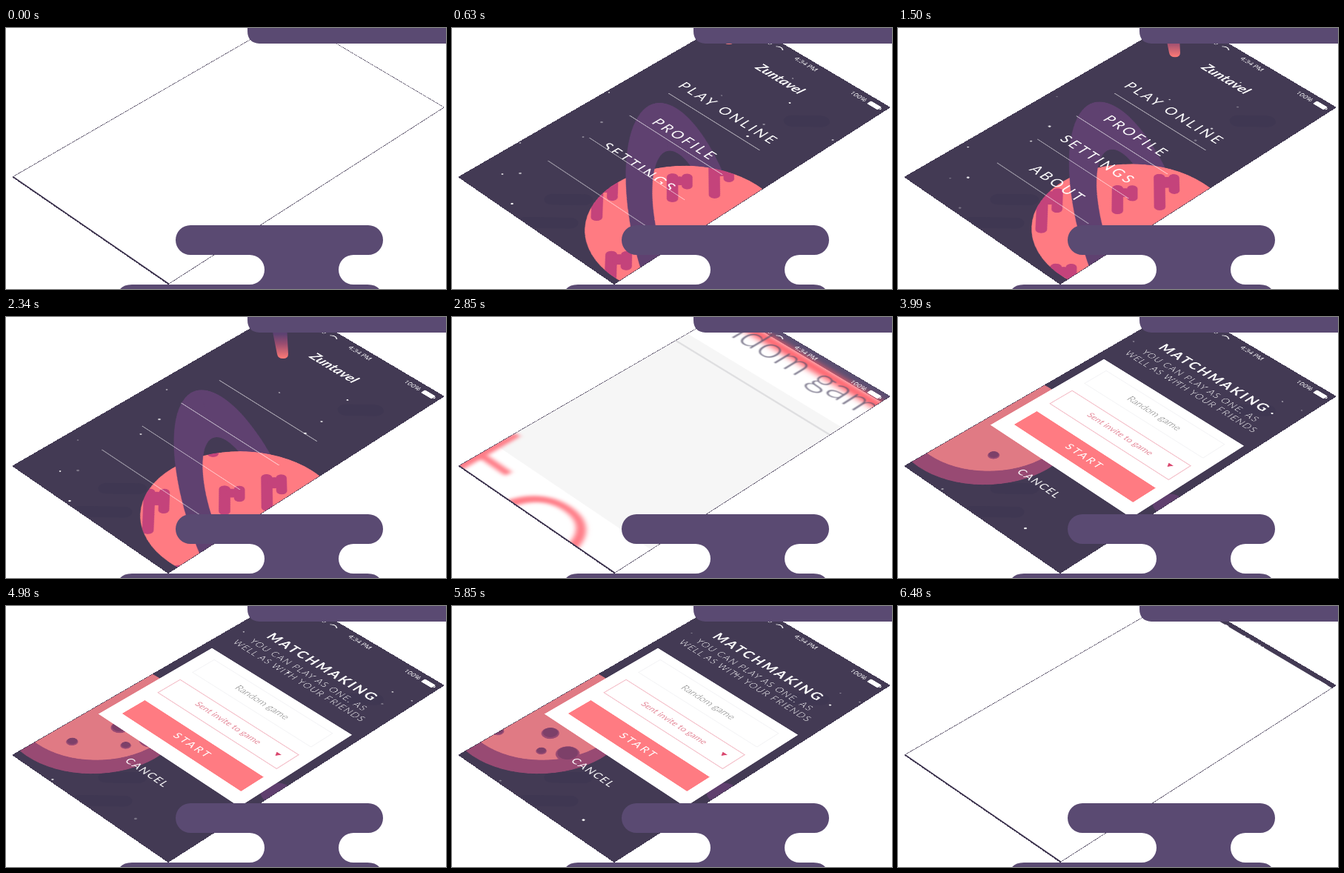
An HTML page that plays this animation: 594x352 px, repeating every 6510 ms.

```html
<!DOCTYPE html>
<html lang="en">
<head>
<meta charset="utf-8">
<title>Space game screens</title>
<style>
html, body { margin: 0; width: 100%; height: 100%; overflow: hidden; background: #fff; }
svg { position: absolute; left: 0; top: 0; }
#phone {
  overflow: hidden; background: #433a54; transform-origin: 0 0;
  transform: matrix3d(.49112, .316515, 0, -.000107341, -.564742, .299609, 0, -.000128, 0, 0, 1, 0, 384, -16, 0, 1);
}
text { font-family: Lato, "Open Sans", sans-serif; fill: #fff; }
.mid { text-anchor: middle; }
#menu .item { font-size: 28px; letter-spacing: 5px; }
.thin { font-size: 19px; font-weight: 300; letter-spacing: 1.8px; }
#status text { font: 14px "Open Sans", sans-serif; }
</style>
</head>
<body>
<svg id="phone" width="375" height="667" viewBox="0 0 375 667">
  <defs>
    <clipPath id="ball"><circle r="166"/></clipPath>
    <clipPath id="front"><rect x="-400" width="800" height="200"/></clipPath>
    <clipPath id="disc"><circle cx="18" cy="498" r="153"/></clipPath>
    <path id="ring" fill-rule="evenodd" d="M-342 0A342 90 0 0 1 342 0A342 90 0 0 1-342 0ZM-208 0A208 49 0 0 1 208 0A208 49 0 0 1-208 0Z"/>
    <filter id="faint" x="-10%" y="-20%" width="120%" height="140%"><feGaussianBlur stdDeviation="1.2"/></filter>
    <filter id="soft" x="-20%" y="-60%" width="140%" height="220%"><feGaussianBlur stdDeviation="4"/></filter>
    <filter id="glow" x="-20%" y="-100%" width="140%" height="300%"><feGaussianBlur stdDeviation="8"/></filter>
  </defs>

  <g fill="#3f3752">
    <rect x="-50" y="-14" width="100" height="28" rx="14" transform="translate(190 640) rotate(-45)"/>
    <rect x="-40" y="-14" width="80" height="28" rx="14" transform="translate(170 575) rotate(-45)"/>
    <rect x="-40" y="-16" width="80" height="32" rx="16" transform="translate(300 135) rotate(-45)"/>
  </g>
  <g id="stars" fill="#fff"></g>

  <g id="menu">
    <g id="world">
      <use id="ringBack" href="#ring" fill="#5f4170"/>
      <circle r="166" fill="#ff7b82"/>
      <g clip-path="url(#ball)"><g transform="rotate(45)"><g id="spots" fill="#c4437b"></g></g></g>
      <g id="ringFront"><use href="#ring" clip-path="url(#front)" fill="#5f4170"/></g>
    </g>
    <text class="mid" x="185" y="90" font-size="29" font-weight="700" font-style="italic">Zuntavel</text>
    <g id="items"></g>
  </g>

  <g id="match">
    <circle cx="376" cy="420" r="27" fill="#5f3f6e"/>
    <g id="moon">
      <circle cx="18" cy="498" r="153" fill="#984a73"/>
      <g clip-path="url(#disc)">
        <circle cx="8" cy="480" r="137" fill="#e07a84"/>
        <g id="craters"></g>
      </g>
    </g>
    <g id="titles">
      <text class="mid" x="190" y="126" font-size="28" font-weight="700" letter-spacing="4">MATCHMAKING</text>
      <text class="mid thin" x="188" y="157">YOU CAN PLAY AS ONE, AS</text>
      <text class="mid thin" x="188" y="181">WELL AS WITH YOUR FRIENDS</text>
      <text class="mid" x="189" y="544" font-size="21" letter-spacing="2.5">CANCEL</text>
    </g>
    <rect id="sheet" fill="#fff"/>
    <g id="card">
      <rect x="45" y="239" width="286" height="53" fill="none" stroke="#ececef"/>
      <text class="mid" x="188" y="271" font-size="20" font-weight="300" style="fill:#777">Random game</text>
      <rect x="45" y="322" width="286" height="53" fill="none" stroke="#f2b3bf" stroke-width="1.5"/>
      <text class="mid" x="188" y="353" font-size="18" style="fill:#e58c9c">Sent invite to game</text>
      <path d="M300 343h11l-5.500 9z" fill="#d9476e"/>
      <rect x="45" y="406" width="286" height="53" fill="#ff7b82"/>
      <text class="mid" x="190" y="440" font-size="22" letter-spacing="4">START</text>
    </g>
  </g>

  <g id="zoom">
    <rect width="375" height="667" fill="#fff"/>
    <rect width="375" height="24" fill="#5b4f72"/>
    <g id="zoomed">
      <rect x="-400" y="126" width="1175" height="459" fill="#f6f6f6"/>
      <rect x="-400" y="154" width="1175" height="4" fill="#dedee0"/>
      <rect x="50" y="22" width="400" height="24" fill="#ff5c66" filter="url(#glow)"/>
      <text class="mid" x="186" y="76" font-size="79" font-weight="300" style="fill:#55506a" opacity=".8" filter="url(#faint)">Random game</text>
      <text x="-50" y="802" font-size="390" font-weight="300" letter-spacing="15" style="fill:#ff7b86" filter="url(#soft)">to</text>
    </g>
  </g>
  <rect id="cover" width="375" height="667" fill="#fff"/>

  <g id="status">
    <text x="104" y="20" text-anchor="end">Nuvo</text>
    <path d="M114 15q8-8 16 0" fill="none" stroke="#fff" stroke-width="2"/>
    <text class="mid" x="187" y="20">4:34 PM</text>
    <text class="mid" x="315" y="22">100%</text>
    <rect x="339" y="11" width="25" height="11" rx="2" fill="#fff"/>
    <rect x="365" y="14" width="2" height="5" fill="#fff"/>
  </g>
  <path d="M0 0H375V665H0Z" fill="none" stroke="#433a54" stroke-width="2"/>
  <path d="M0 665.500H375" stroke="#433a54" stroke-width="3"/>
</svg>

<svg width="594" height="352" viewBox="0 0 594 352">
  <defs>
    <linearGradient id="fire" x1="0" y1="0" x2="0" y2="1">
      <stop offset=".5" stop-color="#5d4272"/>
      <stop offset=".7" stop-color="#9a4d70"/>
      <stop offset="1" stop-color="#ff7b76"/>
    </linearGradient>
  </defs>
  <path id="comet" d="M354-60L378-60L381 0Q381 6 374 6Q367 6 366 0Z" fill="url(#fire)"/>
  <g fill="#5a4a72">
    <path d="M326 0H594V21H342Q326 20 326 4Z"/>
    <path d="M249 266H489A20 20 0 0 1 489 306H469A20 20 0 0 0 469 346H488Q499 346 504 352H154Q159 346 170 346H329A20 20 0 0 0 329 306H249A20 20 0 0 1 249 266Z"/>
  </g>
</svg>

<script>
const LOOP = 6510;
const $ = id => document.getElementById(id);
const set = (el, attrs) => { for (const k in attrs) el.setAttribute(k, attrs[k]); };
function add(parent, tag, attrs, label = '') {
  const el = document.createElementNS('http://www.w3.org/2000/svg', tag);
  set(el, attrs);
  el.textContent = label;
  parent.append(el);
  return el;
}
const clamp = x => Math.max(0, Math.min(1, x));
const ramp = (t, from, to) => clamp((t - from) / (to - from));
const ease = p => 1 - (1 - p) ** 3;
const show = (id, opacity) => {
  $(id).style.opacity = opacity;
  $(id).style.display = opacity > 0 ? '' : 'none';
};

// Stage point to screen coordinates: the inverse of the phone's perspective.
function onScreen(x, y) {
  const a = 184.17 + .04025 * x, b = -376.68 + .0854 * x, r = x - 384;
  const c = 118.69 + .04025 * y, d = 199.84 + .0854 * y, s = y + 16;
  const det = a * d - b * c;
  return [375 * (r * d - b * s) / det, 667 * (a * s - c * r) / det];
}

const stars = [
  [212, 87, 0], [177, 147, 0], [92, 196, 0], [68, 197, 0], [421, 130, 0], [460, 68, 0],
  [456, 101, 0], [202, 127, 0], [92, 155, 0], [81, 237, 0], [364, 91, 0], [514, 151, 0],
  [399, 146, 0], [312, 154, 0], [318, 156, 0],
  [318, 33, 1], [198, 111, 1], [378, 88, 1], [519, 114, 1], [505, 130, 1],
  [545, 126, 1], [60, 232, 1], [172, 285, 1]
].map(([x, y, late], i) => ({
  x, y, late, i, el: add($('stars'), 'circle', { r: 1.4 + (i * 7 % 5) * .25 })
}));

// Each spot is a row of bars: long, a short joint, medium.
for (const [x, y, len] of [[-135, 124, 115], [-145, 0, 75], [-176, -70, 95], [55, 98, 85], [-290, 20, 70]]) {
  add($('spots'), 'rect', { x, y: y + 14, width: len, height: 19, rx: 9 });
  add($('spots'), 'rect', { x: x + 8, y: y + 2, width: len * .3, height: 20, rx: 8 });
  add($('spots'), 'rect', { x, y: y - 10, width: len * .55, height: 18, rx: 9 });
}

const items = ['PLAY ONLINE', 'PROFILE', 'SETTINGS', 'ABOUT'].map((label, i) => {
  const y = 252 + i * 92.700;
  const clip = add($('items'), 'clipPath', { id: 'row' + i });
  add(clip, 'rect', { x: 0, y: y - 60, width: 375, height: 60 });
  const box = add($('items'), 'g', { 'clip-path': `url(#row${i})` });
  const word = add(box, 'text', { class: 'mid item', x: 190, y: y - 25 }, label);
  const line = add($('items'), 'path', { stroke: '#fff', 'stroke-width': 1.4, 'stroke-opacity': .65 });
  return { y, word, line };
});

// Angle, distance and radius of each crater on the turning planet.
const craters = [[35, 88, 10], [-41, 122, 20], [-20, 105, 9], [-35, 60, 15]]
  .map(([angle, far, r]) => ({
    angle, far,
    rim: add($('craters'), 'circle', { r, fill: '#984a73' }),
    pit: add($('craters'), 'circle', { r: r * .85, fill: '#7d4069' })
  }));

function drawStars(t) {
  const late = t > 2850;
  for (const s of stars) {
    const drift = (t - (s.late ? 3990 : 630)) / 1710;
    const [cx, cy] = onScreen(s.x + 5 * drift, s.y + 11 * (s.late ? drift * .3 : drift));
    set(s.el, { cx, cy, opacity: s.late == late ? .65 + .35 * Math.sin(t / 330 + s.i * 2.1) : 0 });
  }
}

function drawMenu(t) {
  show('menu', t < 2770 ? 1 : 0);
  const away = 130 * (1 - ease(ramp(t, 60, 520)));
  const sway = (t - 630) / 1710;
  const tilt = `rotate(${36.7 - 4.2 * sway})`;
  set($('world'), { transform: `translate(${360 + away - 5 * sway} ${489 + away - 8 * sway})` });
  set($('ringBack'), { transform: tilt });
  set($('ringFront'), { transform: tilt });
  set($('spots'), { transform: `translate(${70 * sway} ${5 * sway})` });
  items.forEach(({ y, word, line }, i) => {
    const up = ramp(t, 150 + i * 150, 600 + i * 150) - ramp(t, 1900 + i * 50, 2130 + i * 50);
    const half = (118 - 8 * up) * ease(ramp(t, 90, 400)) * (1 - ramp(t, 2420, 2640));
    set(word, { transform: `translate(0 ${50 * (1 - up)})` });
    set(line, { d: `M${189 - half} ${y}H${189 + half}` });
  });
  show('comet', t < 2700 ? ramp(t, 250, 500) : 0);
  set($('comet'), { transform: `translate(0 ${16 + 34 * sway})` });
}

function drawMatch(t) {
  show('match', t > 2770 ? 1 : 0);
  const grow = ramp(t, 5970, 6510);
  const side = clamp(grow * 1.3);
  const top = 218 * (1 - grow);
  const left = 18 * (1 - side);
  const right = 357 + 18 * side;
  const bottom = 489 + 178 * side;
  set($('sheet'), { x: left, y: top, width: right - left, height: bottom - top });
  const size = 1 + 1.6 * (1 - ease(ramp(t, 2850, 3250)));
  const fit = `translate(188 353) scale(${size}) translate(-188 -353)`;
  set($('sheet'), { transform: fit });
  set($('card'), { transform: fit });
  $('card').style.opacity = 1 - ramp(t, 5970, 6150);
  $('titles').style.opacity = ramp(t, 2980, 3270) - ramp(t, 6000, 6250);
  const away = -150 * (1 - ease(ramp(t, 2900, 3300)));
  set($('moon'), { transform: `translate(${away})` });
  for (const { angle, far, rim, pit } of craters) {
    const a = (angle + (t - 3990) / 30) * Math.PI / 180;
    const cx = 10 + far * Math.cos(a), cy = 490 + far * Math.sin(a);
    set(rim, { cx, cy });
    set(pit, { cx: cx - 1.5, cy: cy - 1.5 });
  }
}

function drawZoom(t) {
  show('zoom', t < 3200 ? ramp(t, 2660, 2760) - ramp(t, 2890, 3100) : 0);
  const size = t < 2850 ? 1 + .5 * (1 - ramp(t, 2670, 2850)) : 1 - .7 * ramp(t, 2850, 3150);
  set($('zoomed'), { transform: `translate(187 333) scale(${size}) translate(-187 -333)` });
  show('cover', 1 - ramp(t, 30, 350));
}

function frame() {
  const t = performance.now() % LOOP;
  drawStars(t);
  drawMenu(t);
  drawMatch(t);
  drawZoom(t);
  requestAnimationFrame(frame);
}
frame();
</script>
</body>
</html>
```
